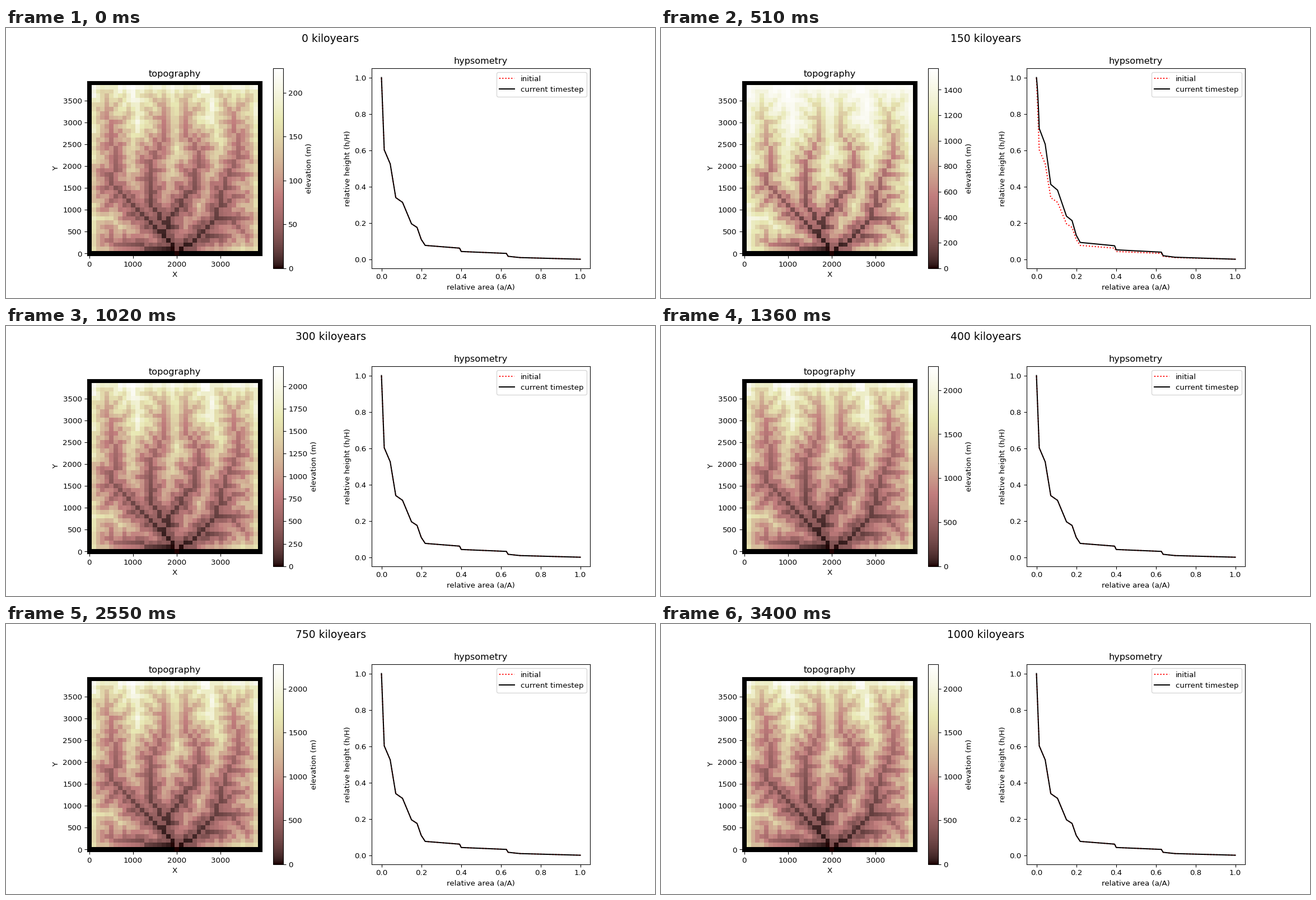
A matplotlib script for the animation above (3.57 s loop, 1159 px wide and 483 px high).

```python
import numpy as np
import matplotlib.pyplot as plt
from matplotlib.animation import FuncAnimation

N = 40                  # grid nodes per side
DX = 100                # node spacing (m)
STEP = 50               # kiloyears per frame
FRAMES = 21
OUTLET = (0, 20)        # row, column
UPLIFT_RATIO = 10       # new uplift rate / initial rate
PEAK, HEAD = 227.6, 180.0   # initial elevation of summit and trunk head (m)

# Main valleys as (column, row) waypoints; tributaries grow by themselves.
VALLEYS = [
    [(20, 0), (19, 1), (19, 2), (5, 16), (6, 22), (4, 33)],
    [(17, 4), (18, 8), (24, 15), (25, 23), (22, 27), (22, 34)],
    [(18, 6), (14, 11), (14, 20), (17, 27), (17, 33)],
    [(20, 0), (24, 3), (29, 8), (31, 17), (34, 22), (33, 32)],
    [(19, 1), (6, 2)],
]

# Knees of the trunk profile: (relative area, relative height).
KNEES = [(1, 0), (.697, .009), (.637, .016), (.628, .032), (.401, .0425),
         (.393, .061), (.22, .076), (.2, .109), (.179, .175), (.151, .195),
         (.106, .313), (.072, .339), (.044, .525), (.014, .602), (0, 1)]

NEIGHBOURS = [(dr, dc) for dr in (-1, 0, 1) for dc in (-1, 0, 1) if dr or dc]
LENGTHS = np.array([np.hypot(*n) for n in NEIGHBOURS])


def carve(cost, line, value):
    for (c0, r0), (c1, r1) in zip(line, line[1:]):
        n = max(abs(c1 - c0), abs(r1 - r0)) + 1
        rows = np.rint(np.linspace(r0, r1, n)).astype(int)
        cols = np.rint(np.linspace(c0, c1, n)).astype(int)
        cost[rows, cols] = value


def route(cost):
    """Cheapest D8 path of every core node to the outlet."""
    cost = cost.copy()
    cost[[0, -1]] = np.inf
    cost[:, [0, -1]] = np.inf
    dist = np.full((N, N), np.inf)
    dist[OUTLET] = 0
    for _ in range(160):
        options = np.stack([np.roll(dist, n, (0, 1)) + cost * length
                            for n, length in zip(NEIGHBOURS, LENGTHS)])
        dist = np.minimum(dist, options.min(0))
    best = options.argmin(0)
    shift = np.array(NEIGHBOURS)[best]
    rows, cols = np.indices((N, N))
    receiver = (rows - shift[..., 0]) * N + cols - shift[..., 1]
    return dist.ravel(), receiver.ravel(), LENGTHS[best].ravel()


def drainage(dist, receiver, core):
    area = np.ones(N * N)
    for i in core[np.argsort(-dist[core])]:
        area[receiver[i]] += area[i]
    return area


def evolve(start, drop, receiver):
    """Implicit stream-power response to faster uplift, one state per frame.

    Times are in kiloyears; receiver -1 marks the outlet at height zero.
    """
    system = np.diag(1 + 1 / drop)
    inner = np.flatnonzero(receiver >= 0)
    system[inner, receiver[inner]] -= 1 / drop[inner]
    jump = np.linalg.matrix_power(np.linalg.inv(system), STEP)
    gap = (1 - UPLIFT_RATIO) * start
    states = np.empty((FRAMES, len(start)))
    for k in range(FRAMES):
        states[k] = UPLIFT_RATIO * start + gap
        gap = jump @ gap
    return states


def build_terrain():
    noise = np.random.default_rng(7).random((N, N))
    core = np.arange(N * N).reshape(N, N)[1:-1, 1:-1].ravel()
    cost = 0.5 + 1.3 * noise
    for line in VALLEYS:
        carve(cost, line, 0.15)
    for _ in range(4):
        dist, receiver, length = route(cost)
        area = drainage(dist, receiver, core)
        cost = area.reshape(N, N) ** -0.5 * (1 + 0.5 * noise)

    drop = length / np.sqrt(area)
    z = np.zeros(N * N)
    for i in core[np.argsort(dist[core])]:
        z[i] = z[receiver[i]] + drop[i]
    scale = PEAK / z.max()

    index = np.full(N * N, -1)
    index[core] = np.arange(len(core))
    states = evolve(z[core] * scale, drop[core] * scale, index[receiver[core]])

    grid = np.full((FRAMES, N, N), np.nan)
    grid[:, 1:-1, 1:-1] = states.reshape(FRAMES, N - 2, N - 2)
    grid[(slice(None), *OUTLET)] = 0
    return np.ma.masked_invalid(grid)


def build_profile():
    """Relative area and, per frame, relative height along the trunk."""
    area, height = np.transpose(KNEES)
    tau = np.union1d(HEAD * height, np.linspace(0, HEAD, 15))
    states = evolve(tau[1:], np.diff(tau), np.arange(len(tau) - 1) - 1)
    states = np.hstack([np.zeros((FRAMES, 1)), states])
    return (np.interp(tau, HEAD * height, area),
            states / states.max(axis=1, keepdims=True))


terrain = build_terrain()
area, profile = build_profile()

fig, (ax_map, ax_hyp) = plt.subplots(1, 2, figsize=(12, 5), dpi=96.61)
fig.subplots_adjust(wspace=0.3, top=0.85)
title = fig.suptitle("0 kiloyears", fontsize=14)

cmap = plt.get_cmap("pink").copy()
cmap.set_bad("black")
edge = (-DX / 2, (N - 0.5) * DX)
image = ax_map.imshow(terrain[0], cmap=cmap, origin="lower", extent=edge * 2,
                      vmin=0, vmax=terrain[0].max(), interpolation="nearest")
ax_map.set(title="topography", xlabel="X", ylabel="Y")
fig.colorbar(image, ax=ax_map, label="elevation (m)")

ax_hyp.plot(area, profile[0], "r:", label="initial")
current, = ax_hyp.plot(area, profile[0], "k-", label="current timestep")
ax_hyp.set(title="hypsometry", xlabel="relative area (a/A)",
           ylabel="relative height (h/H)", xlim=(-0.05, 1.05),
           ylim=(-0.05, 1.05))
ax_hyp.legend(loc="upper right")


def update(k):
    title.set_text(f"{k * STEP} kiloyears")
    image.set_data(terrain[k])
    image.set_clim(0, terrain[k].max())
    current.set_ydata(profile[k])
    return title, image, current


anim = FuncAnimation(fig, update, frames=FRAMES, interval=170,
                     init_func=lambda: update(0), repeat=True, repeat_delay=0,
                     blit=False)
plt.show()
```
